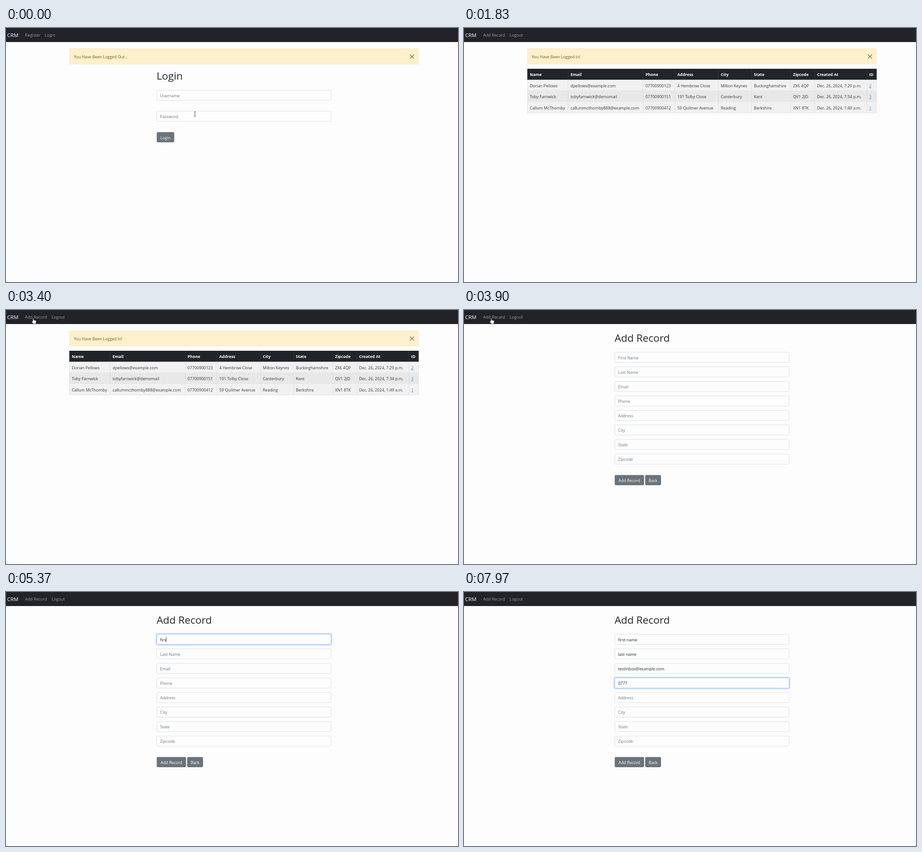
Animation, 998 px wide and 561 px high, one loop 8000 ms. Source, as an HTML page:

```html
<!DOCTYPE html>
<html lang="en">
<head>
<meta charset="utf-8">
<title>CRM</title>
<style>
  html, body { margin: 0; width: 100%; height: 100%; overflow: hidden; background: #fdfdfd; }
  svg { display: block; width: 100vw; height: 100vh; }
  text { font: 8.9px "Open Sans", "Noto Sans", sans-serif; fill: #212529; white-space: pre; }
  .brand { font-size: 11.6px; fill: #fff; }
  .link { font-size: 9.05px; fill: #9b9da0; }
  .title { font-size: 22.7px; }
  .notice { fill: #745b10; }
  .placeholder { fill: #6c757d; }
  .button { fill: #fff; text-anchor: middle; }
  .head { font-weight: 700; fill: #fff; }
  .cell { fill: #34383c; }
  .id { fill: #3f84ee; text-decoration: underline; }
</style>
</head>
<body>
<svg id="stage" viewBox="0 0 998 561" preserveAspectRatio="none"></svg>
<script>
const LOOP = 8000, BLINK = 160;
const LIST_AT = 1600, ADD_AT = 3640;
const FIELD = { x: 332.8, w: 385, h: 22.5 };
const stage = document.getElementById('stage');

function el(parent, tag, attrs = {}, content = '') {
  const node = document.createElementNS('http://www.w3.org/2000/svg', tag);
  for (const key in attrs) node.setAttribute(key, attrs[key]);
  node.textContent = content;
  return parent.appendChild(node);
}
const group = parent => el(parent, 'g');
const rect = (parent, x, y, width, height, fill, more) =>
  el(parent, 'rect', { x, y, width, height, fill, ...more });
const label = (parent, x, y, content, cls = '') => el(parent, 'text', { x, y, class: cls }, content);
const line = (parent, d, stroke, width = 0.7) =>
  el(parent, 'path', { d, stroke, 'stroke-width': width, fill: 'none' });
const show = (node, on) => { node.style.display = on ? '' : 'none'; };

function makePage(links) {
  const page = group(stage);
  rect(page, 0, 0, 998, 31, '#212329');
  label(page, 2.5, 20, 'CRM', 'brand');
  for (const [x, name] of links) label(page, x, 19, name, 'link');
  return page;
}

function makeAlert(page, message) {
  rect(page, 140.3, 45.8, 770.4, 34, '#fdf0cd', { rx: 2.4, stroke: '#fbe6a6', 'stroke-width': 0.8 });
  label(page, 149.8, 67, message, 'notice');
  line(page, 'M891.8 58.6l9 9m0-9l-9 9', '#5f5a4c', 1.15);
}

function makeButton(page, x, y, width, name) {
  rect(page, x, y, width, 22.5, '#6b737b', { rx: 2.4 });
  label(page, x + width / 2, y + 15.5, name, 'button');
}

function makeField(page, y, name) {
  const ring = rect(page, FIELD.x - 1.2, y - 1.2, FIELD.w + 2.4, FIELD.h + 2.4, 'none',
    { rx: 3.4, stroke: '#c2dafb', 'stroke-width': 2.4 });
  const box = rect(page, FIELD.x, y, FIELD.w, FIELD.h, '#fdfdfd', { rx: 2.4, 'stroke-width': 0.8 });
  const hint = label(page, 340.3, y + 15.3, name, 'placeholder');
  const value = label(page, 340.3, y + 15.3, '');
  const caret = rect(page, 0, y + 5.6, 0.8, 11.6, '#212529');
  return { y, ring, box, hint, value, caret };
}

// Typing steps, one per field: content, time of focus, first key, ms per key
const loginTyping = [
  ['user', 340, 560, 80],
  ['••••••••', 960, 1150, 45]
];
const addTyping = [
  ['first name', 4750, 5170, 62],
  ['last name', 5800, 5850, 60],
  ['testinbox@example.com', 6390, 6410, 56],
  ['0777', 7600, 7630, 55]
];

const loginPage = makePage([[42, 'Register'], [85.5, 'Login']]);
makeAlert(loginPage, 'You Have Been Logged Out...');
label(loginPage, 332.5, 114, 'Login', 'title');
const loginFields = [makeField(loginPage, 137.4, 'Username'), makeField(loginPage, 183.7, 'Password')];
makeButton(loginPage, 332.8, 230, 38.6, 'Login');

const memberLinks = [[42, 'Add Record'], [100.7, 'Logout']];
const listPage = makePage(memberLinks);
makeAlert(listPage, 'You Have Been Logged In!');
makeTable(listPage);

const addPage = makePage(memberLinks);
label(addPage, 332.5, 70, 'Add Record', 'title');
const addFields = ['First Name', 'Last Name', 'Email', 'Phone', 'Address', 'City', 'State', 'Zipcode']
  .map((name, i) => makeField(addPage, 93.3 + i * 32.12, name));
makeButton(addPage, 332.8, 364.4, 64.8, 'Add Record');
makeButton(addPage, 400, 364.4, 35, 'Back');

function makeTable(page) {
  const left = 140, right = 911, top = 90, rowHeight = 24.4;
  const columns = [140, 230, 395.6, 465.8, 561.8, 634.8, 721.3, 774.3, 889.4];
  const rows = [
    ['Name', 'Email', 'Phone', 'Address', 'City', 'State', 'Zipcode', 'Created At', 'ID'],
    ['Dorian Pellows', 'dpellows@example.com', '07700900123', '4 Hembrow Close', 'Milton Keynes',
      'Buckinghamshire', 'ZX6 4QP', 'Dec. 26, 2024, 7:29 p.m.', '2'],
    ['Toby Farnwick', 'tobyfarnwick@demomail', '07700900151', '191 Tolby Close', 'Canterbury',
      'Kent', 'QV1 2JD', 'Dec. 26, 2024, 7:34 p.m.', '3'],
    ['Callum McThornby', 'callummcthornby888@example.com', '07700900412', '59 Quilmer Avenue', 'Reading',
      'Berkshire', 'XN1 8TK', 'Dec. 26, 2024, 1:49 a.m.', '1']
  ];
  const fills = ['#212529', '#f1f1f1', '#e8e8e8', '#f1f1f1'];
  rows.forEach((cells, r) => {
    const y = top + r * rowHeight, edge = r ? '#d9dadd' : '#3b3f44';
    rect(page, left, y, right - left, rowHeight, fills[r]);
    line(page, `M${left} ${y + rowHeight}H${right}`, edge);
    cells.forEach((content, c) => {
      line(page, `M${columns[c]} ${y}v${rowHeight}`, edge);
      label(page, columns[c] + 5.2, y + 16.4, content, r === 0 ? 'head' : c === 8 ? 'id' : 'cell');
    });
    line(page, `M${right} ${y}v${rowHeight}`, edge);
  });
}

const cursor = group(stage);
const outline = { stroke: '#222', 'stroke-width': 0.7, fill: '#fff', 'stroke-linejoin': 'round' };
const pointers = {
  arrow: el(cursor, 'path', { ...outline, d: 'M0 0V9.4L2.2 7.4L3.7 10.7L5.2 10L3.8 6.8H6.8Z' }),
  beam: el(cursor, 'path', {
    d: 'M-2-5h1.5l.5.5l.5-.5H2M0-4.5v9M-2 5h1.5l.5-.5l.5.5H2', fill: 'none', stroke: '#333', 'stroke-width': 0.9
  }),
  hand: el(cursor, 'path', {
    ...outline,
    d: 'M-.9.8Q0-.7.9.8V4.3L5.6 5.3Q6.8 5.7 6.6 7L5.8 12.5H.2L-3.2 8Q-3.3 6.4-1.8 6.8L-.9 7.6Z'
  })
};

const path = [
  [0, 417, 190], [120, 417, 190], [320, 419, 150], [2500, 419, 150],
  [2700, 438, 222], [2930, 434, 171], [3330, 60, 18], [4200, 60, 18], [4700, 420, 106]
];
const hidden = [[540, 2520], [5150, LOOP]];

function cursorAt(t) {
  const next = path.findIndex(step => step[0] > t);
  if (next < 0) return path[path.length - 1].slice(1);
  const [t0, x0, y0] = path[next - 1], [t1, x1, y1] = path[next];
  const u = (t - t0) / (t1 - t0), k = u * u * (3 - 2 * u);
  return [x0 + (x1 - x0) * k, y0 + (y1 - y0) * k];
}

function drawFields(fields, typing, t) {
  const focused = typing.filter(step => step[1] <= t).length - 1;
  fields.forEach((field, i) => {
    const [content, focusAt, start, step] = typing[i] || ['', Infinity, Infinity, 1];
    const count = t < start ? 0 : Math.min(content.length, Math.floor((t - start) / step) + 1);
    const lastInput = count ? start + (count - 1) * step : focusAt;
    const active = i === focused;
    const lit = active && Math.floor((t - lastInput) / BLINK) % 2 === 0;
    field.value.textContent = content.slice(0, count);
    field.box.setAttribute('stroke', active ? '#8bb9fb' : '#d5d8e0');
    show(field.ring, active);
    show(field.hint, count === 0);
    show(field.caret, lit);
    if (lit) field.caret.setAttribute('x', 340.2 + (count ? field.value.getComputedTextLength() : 0));
  });
}

function drawCursor(fields, t) {
  const [x, y] = cursorAt(t);
  const overField = x > FIELD.x && x < FIELD.x + FIELD.w &&
    fields.some(field => y > field.y && y < field.y + FIELD.h);
  const shape = overField ? 'beam' : y < 28 && x > 42 && x < 131 ? 'hand' : 'arrow';
  for (const name in pointers) show(pointers[name], name === shape);
  cursor.setAttribute('transform', `translate(${x.toFixed(1)} ${y.toFixed(1)})`);
  show(cursor, !hidden.some(([from, to]) => t >= from && t < to));
}

function draw(t) {
  const page = t < LIST_AT ? loginPage : t < ADD_AT ? listPage : addPage;
  for (const each of [loginPage, listPage, addPage]) show(each, each === page);
  if (page === loginPage) drawFields(loginFields, loginTyping, t);
  if (page === addPage) drawFields(addFields, addTyping, t);
  drawCursor(page === loginPage ? loginFields : page === addPage ? addFields : [], t);
}

const began = performance.now();
function tick() {
  draw((performance.now() - began) % LOOP);
  requestAnimationFrame(tick);
}
tick();
</script>
</body>
</html>
```
